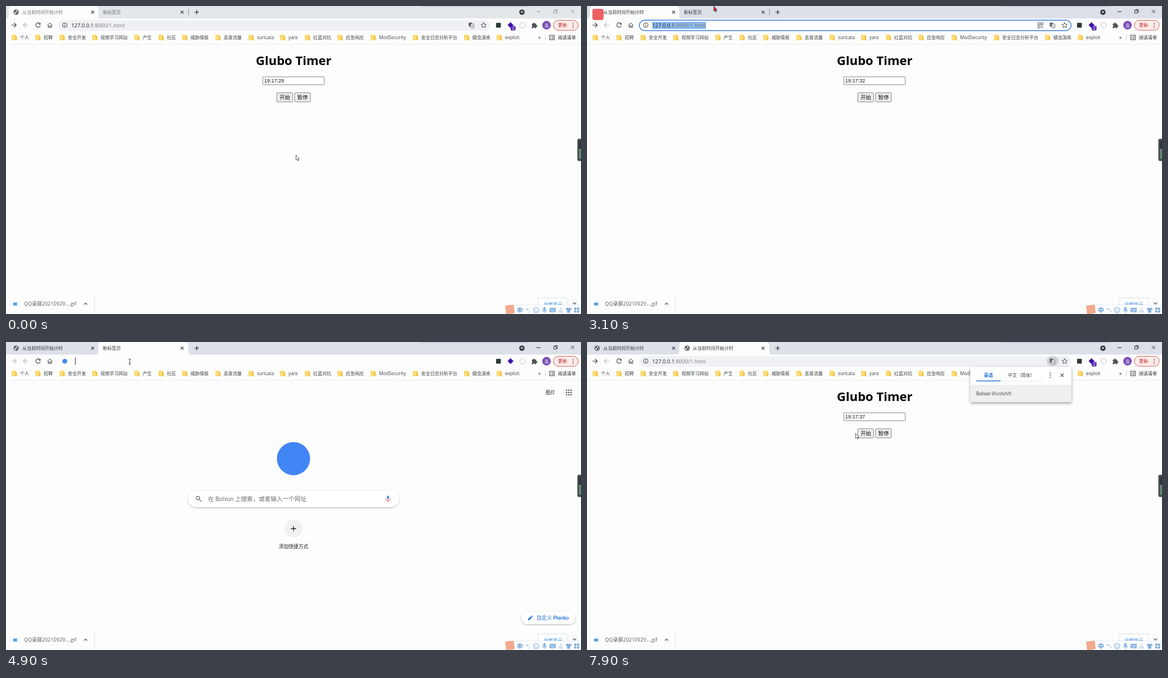
Recreate the animation shown at these times as an HTML page. Size 1022 by 548 pixels, loop 8 s.

```html
<!DOCTYPE html>
<html lang="zh-CN">
<head>
<meta charset="utf-8">
<title>Timer</title>
<style>
html, body { margin: 0; width: 100%; height: 100%; overflow: hidden; background: #fdfdfd; }
svg { display: block; width: 100vw; height: 100vh; }
text { font-family: "Open Sans", "Noto Sans CJK SC", "Noto Sans CJK", sans-serif; white-space: pre; }
.web { font-family: Roboto, "Noto Sans CJK SC", "Noto Sans CJK", sans-serif; }
.field { font-family: "Liberation Sans", "Noto Sans CJK SC", "Noto Sans CJK", sans-serif; }
</style>
</head>
<body>
<svg id="stage" viewBox="0 0 1022 548"></svg>
<script>
const PAGE = '#fdfdfd', INK = '#3c4043', GREY = '#5f6368', BLUE = '#1a6fd8';
const TITLE = '从当前时间开始计时', BRAND = 'Bolvun';
const LOOP = 8000, STEP = 100;

const text = (x, y, s, size = 8, fill = INK, more = '') =>
  `<text x="${x}" y="${y}" font-size="${size}" fill="${fill}" ${more}>${s}</text>`;
const rect = (x, y, w, h, fill, more = '') =>
  `<rect x="${x}" y="${y}" width="${w}" height="${h}" fill="${fill}" ${more}/>`;
const disc = (x, y, r, fill, more = '') =>
  `<circle cx="${x}" cy="${y}" r="${r}" fill="${fill}" ${more}/>`;
const line = (d, color = INK, w = 1.1, more = '') =>
  `<path d="${d}" fill="none" stroke="${color}" stroke-width="${w}" ${more}/>`;
const fill = (d, color) => `<path d="${d}" fill="${color}"/>`;
const at = (x, y, s) => `<g transform="translate(${x} ${y})">${s}</g>`;
const group = (id, s) => `<g id="${id}">${s}</g>`;
const tone = s => `<tspan fill="#777b80">${s}</tspan>`;

const cross = (x, y, r = 2.5, color = INK, w = 1.1) =>
  line(`M${x - r} ${y - r}l${2 * r} ${2 * r}m0 ${-2 * r}l${-2 * r} ${2 * r}`, color, w);
const plus = (x, y, r, w) => line(`M${x - r} ${y}h${2 * r}M${x} ${y - r}v${2 * r}`, '#222', w);
const lens = (x, y, k, color) =>
  disc(x - k * .3, y - k * .3, k * .65, 'none', `stroke="${color}" stroke-width="1.1"`) +
  line(`M${x + k * .2} ${y + k * .2}l${k * .8} ${k * .8}`, color, 1.3);
const globe = (x, y) => at(x, y,
  disc(0, 0, 4.7, '#50555a') +
  fill('M-3.6-.8L-1.2.2.2 1.6-.6 3.6-2.6 2.6ZM-.6-3.6L1.8-3 2.6-1.4.6-.6-.8-1.8ZM1.4.6L3.6.4 2.4 2.8Z', '#f4f5f6'));
const tab = (x, w) => fill(
  `M${x - 5} 22.5q5 0 5-5V6q0-6 6-6h${w - 12}q6 0 6 6v11.5q0 5 5 5z`, PAGE);
const arrowIcon = (x, dir, color) =>
  line(`M${x - dir * 4} 34h${dir * 8.5}M${x - dir * .2} 30l${-dir * 4} 4 ${dir * 4} 4`, color, 1.1);
const folder = x =>
  rect(x, 51, 8, 10, '#fbdc78', 'rx="1"') + rect(x + 6, 53.5, 3.5, 7.5, '#f3c84f', 'rx="1"');

function titleBar() {
  const buttons = group('winKeys',
    line('M943 10h7', 'currentColor') +
    line('M973.5 8h4.8v4.8h-4.8zM975.2 8V6.4h4.8v4.8h-1.7', 'currentColor', .9) +
    cross(1007, 9.5, 3, 'currentColor', .9));
  return rect(0, 0, 1022, 22.5, '#dde1e8', 'id="strip"') +
    group('tabA', tab(5, 159) + line('M324.5 5v12', '#8c9096', 1)) +
    group('tabB', tab(164, 160)) +
    rect(737, 0, 192, 1.3, '#c3c7df') +
    globe(18, 11) + text(29, 14.4, TITLE, 8, 'currentColor') + cross(154, 11) +
    group('blankTitle', text(172, 14.4, '新标签页', 8, 'currentColor')) +
    group('loadedTitle', globe(178, 11) + text(188, 14.4, TITLE, 8, 'currentColor')) +
    cross(313, 11) + plus(339, 11, 4, 1.2) +
    disc(917, 11, 4.8, '#3a3d42') + fill('M914.6 9.8h4.8l-2.4 2.8z', '#fff') + buttons;
}

function toolbar() {
  const info = disc(104.5, 34, 4, 'none', `stroke="${INK}"`) + line('M104.5 33.4v2.8M104.5 31.4v1.1');
  const qr = [[801.5, 30], [807, 30], [801.5, 35.5]].map(([x, y]) =>
    rect(x, y, 3.6, 3.6, 'none', `stroke="${GREY}" stroke-width="1"`)).join('') +
    rect(807, 35.5, 1.8, 1.8, GREY) + rect(809, 37.5, 1.8, 1.8, GREY);
  const star = line('M849 29.4l1.4 3 3.3.4-2.4 2.2.7 3.3-3-1.7-3 1.7.7-3.3-2.4-2.2 3.3-.4z', INK, .9);
  const language = rect(822.4, 29.6, 6, 7, GREY, 'rx=".8"') +
    rect(826, 31.8, 6, 7.2, PAGE, `rx=".8" stroke="${GREY}" stroke-width=".7"`) +
    text(826.7, 37.4, '文', 4.8, GREY);
  const extras = rect(871, 30, 8.5, 8.5, '#2a3a38', 'rx="1"') +
    rect(893, 30.2, 7.4, 7.4, '#3d10a8', 'transform="rotate(45 896.7 34)"') +
    group('badge', rect(897, 35.4, 8.6, 8.2, '#5b2bb5', 'rx="1.5"') +
      text(901.3, 42.3, '2', 7.4, '#fff', 'text-anchor="middle"')) +
    disc(918, 34.3, 4.8, 'none', 'stroke="#b9bcc0" stroke-width=".9"') +
    fill('M934.5 31.5h2.4a1.5 1.5 0 1 1 2.9 0h2.7v2.6a1.5 1.5 0 1 1 0 2.9v2.4h-2.6a1.4 1.4 0 0 0-2.8 0h-2.6v-2.6a1.5 1.5 0 0 0 0-2.9z', '#4d5156') +
    disc(960.7, 34.2, 7.6, '#7a4fb5') +
    text(960.7, 36.8, '晶', 7, '#eee', 'text-anchor="middle"') +
    rect(973, 25.5, 44, 17.6, '#fceeed', 'rx="8.8" stroke="#cf4a42" stroke-width=".9"') +
    text(981, 37.2, '更新', 8.3, '#c5221f') +
    [30.6, 34.2, 37.8].map(y => disc(1008, y, .95, '#c5221f')).join('');
  const url = text(116, 37.8, `127.0.0.1${tone(':8000/1.html')}`, 9.4, '#202124');
  return rect(0, 22.5, 1022, 45.5, PAGE) + rect(0, 67.6, 1022, .8, '#e6e7e3') +
    group('backOn', arrowIcon(14, -1, INK)) + group('backOff', arrowIcon(14, -1, '#b4b7ba')) +
    arrowIcon(35, 1, '#b4b7ba') +
    line('M60.4 31.6a4 4 0 1 0 .5 3.5') + fill('M61.4 29.8v3.5h-3.5z', INK) +
    line('M73.6 34.4L78 30.2l4.4 4.2M75 33.6v4.6h2v-2.8h2v2.8h2v-4.6', INK, 1) +
    group('siteBar',
      rect(92.5, 25, 768, 19, '#f0f1f4', 'rx="9.5"') +
      group('ring', rect(93, 25.2, 767.5, 18.6, '#fff', 'rx="9.3" stroke="#3f7fd9" stroke-width="1.5"') +
        rect(116, 28, 95.5, 13, '#8db9ec')) +
      info + url + group('qr', qr) +
      group('lit', rect(817, 25.8, 21, 16.6, '#cdd0d4', 'rx="8.3"')) + language + star) +
    extras;
}

function bookmarks() {
  const items = [[25, '个人'], [67, '招聘'], [110, '安全开发'], [168, '视频学习网站'], [243, '产生'],
    [286, '社区'], [328, '威胁情报'], [387, '恶意流量'], [446, 'suricata'], [502, 'yara'],
    [546, '红蓝对抗'], [604, '应急响应'], [663, 'ModSecurity'], [738, '安全日志分析平台'],
    [829, '蠕虫演练'], [887, 'exploit']];
  return items.map(([x, s]) => folder(x - 15) + text(x, 59, s, /[a-z]/.test(s) ? 8.2 : 8)).join('') +
    text(946, 59, '»', 9, '#222') + line('M958.5 51v10', '#cfd1d4', 1) +
    rect(966.3, 52, 8.4, 8, 'none', `stroke="${INK}"`) +
    line('M968 54.5h1m1 0h3M968 56.2h1m1 0h3M968 58h1m1 0h3', INK, .8) +
    text(981, 59, '阅读清单', 8, '#222');
}

function timerPage() {
  const key = (x, w, s) =>
    rect(x, 154.4, w, 16.2, '#efefef', 'rx="1.5" stroke="#767676" stroke-width=".9"') +
    text(x + w / 2, 166.1, s, 9.5, '#111', 'class="field" text-anchor="middle"');
  return text(511.3, 105.2, 'Glubo Timer', 22, '#000', 'font-weight="700" text-anchor="middle"') +
    rect(456.4, 126, 109.4, 14, '#fff', 'rx="1.3" stroke="#767676" stroke-width=".9"') +
    text(459, 136, '', 9.1, '#111', 'id="clock" class="field"') +
    key(481.4, 28, '开始') + key(513, 28, '暂停');
}

function newTab() {
  const dots = [0, 1, 2].flatMap(i => [0, 1, 2].map(j =>
    rect(995.2 + i * 4, 84.8 + j * 4, 2.3, 2.3, '#4d5156', 'rx=".5"'))).join('');
  return text(959, 93, '图片', 8.6, '#222') + dots +
    disc(511, 207.5, 29.5, '#4285f4') +
    rect(323.5, 264, 375, 30, '#fff', 'rx="15" filter="url(#soft)"') +
    lens(342.5, 279, 4.6, GREY) +
    text(359, 282.7, `在 ${BRAND} 上搜索，或者输入一个网址`, 10.6, '#6a6e73', 'class="web"') +
    rect(677.3, 273.4, 3.4, 6.6, '#4285f4', 'rx="1.7"') +
    line('M675.2 278.4a3.8 3.8 0 0 0 7.6 0', '#ea6a4a', 1) + line('M679 282.2v2.6', '#ea4335', 1.2) +
    disc(511, 332, 16, '#f0f1f3') + plus(511, 332, 4.6, 1.3) +
    text(511, 366.8, '添加快捷方式', 8.7, '#222', 'text-anchor="middle"') +
    rect(916, 480, 96, 22, '#fff', 'rx="11" filter="url(#soft)"') +
    fill('M928 495v-1.9l5-5 1.9 1.9-5 5zM933.6 487.4l.9-.9 1.9 1.9-.9.9z', BLUE) +
    text(943, 494.2, '自定义 Plenko', 9.1, BLUE, 'class="web" font-weight="500"');
}

const fullUrl = `${tone('http://')}127.0.0.1${tone(':8000/1.html')}`;

function dropdown() {
  const addr = 'http://127.0.0.1:8000/1.html';
  return rect(89, 23, 776, 103.5, '#fff', 'rx="5" filter="url(#deep)"') +
    rect(89, 46.5, 776, 49.5, '#f0f0f1') + rect(89, 47, 1.8, 24, '#2b73d6') +
    globe(105, 59) +
    text(123, 62.2, TITLE, 9.35, '#222') + text(209.7, 62.2, '-', 9.4, '#777b80') +
    text(217, 62.2, addr, 9.6, '#2b62cc', 'font-weight="600"') +
    cross(851.5, 58.5, 2.8) +
    rect(121, 71.3, 106, 19.5, 'none', 'rx="9.7" stroke="#c3c6ca" stroke-width=".9"') +
    rect(129.8, 77.8, 7.4, 6.4, 'none', `stroke="${INK}" stroke-width=".9"`) + rect(133.5, 77.5, 4, 2.4, INK) +
    text(144, 84.4, '切换到这个标签页', 9.4, '#222') +
    lens(104.6, 108.4, 3.9, GREY) +
    text(123, 112, addr, 9.5, '#202124') +
    text(251, 112, `- ${BRAND} 搜索`, 9.4, '#777b80');
}

function languageBubble() {
  return rect(681.5, 44, 179.5, 63, '#fff', 'rx="2.5" filter="url(#deep)"') +
    rect(681.5, 76, 179.5, 31, '#eff0ee', 'rx="2"') +
    rect(735, 69, 75, .8, '#e0e2e4') + rect(692, 68.6, 43, 1.4, BLUE) +
    text(705.5, 62.2, '英语', 8, BLUE, 'font-weight="700"') +
    text(748, 62.2, '中文（简体）', 8, INK) +
    [55.2, 59, 62.8].map(y => disc(823.3, y, .95, INK)).join('') + cross(844.5, 59, 2.8) +
    text(692, 95, `<tspan font-weight="500">${BRAND}</tspan> Wordshift`, 8.2, GREY, 'class="web"');
}

function shelf() {
  const c = '#7fb0df';
  const ime = rect(888, 531.5, 134, 16.5, '#fdfdfe') + rect(904, 531.5, 118, .7, '#d8e4ef') +
    rect(888, 532, 15.5, 15.5, '#f3aa8c', 'rx="2" transform="rotate(-7 896 540)"') +
    text(908.3, 544.6, '中', 10.4, '#4c8fd0', 'font-weight="700"') +
    disc(926.5, 539.5, 1.5, 'none', `stroke="${c}"`) + line('M931 542.5q.4 2-1.4 2.6', c, 1.3) +
    disc(942.3, 541, 4.8, 'none', `stroke="${c}" stroke-width="1.1"`) +
    disc(940.5, 539.6, .8, c) + disc(944.1, 539.6, .8, c) + line('M939.6 542.2q2.7 2.8 5.4 0', c, 1) +
    rect(955, 535.5, 4, 7, c, 'rx="2"') + line('M953.2 540a3.8 3.8 0 0 0 7.6 0M957 544v2.4', c, 1.1) +
    rect(966, 537, 11, 8, c, 'rx="1"') +
    line('M967.5 539.4h8M967.5 541.3h8', '#fff', .9, 'stroke-dasharray="1.2 1"') + line('M969 543.4h5', '#fff', .9) +
    disc(986, 538.3, 2, '#d5dfe9') + fill('M981.5 545.5q0-4.8 4.5-4.8t4.5 4.8z', '#d5dfe9') +
    fill('M997.6 536.5q2.4 2 4.8 0l3 2-1.2 2.4-1.4-.6v5.4h-5.6v-5.4l-1.4.6-1.2-2.4z', c) +
    [[1010, 536.5], [1015, 536.5], [1010, 541.5], [1015, 541.5]].map(([x, y]) => rect(x, y, 4, 4, c, 'rx=".7"')).join('');
  return fill('M13.5 525h5l2.5 2.5v7.5h-7.5z', '#dfeaf4') + rect(12.5, 528, 7, 4.6, '#4a9fd8', 'rx=".6"') +
    text(32, 533.2, 'QQ录屏20210929....gif', 9, '#55595e') +
    line('M138.6 531.4l2.9-2.9 2.9 2.9') + line('M157 516v29', '#dadce0', .9) +
    rect(945.5, 519.5, 52.5, 20, '#fff', 'rx="2" stroke="#dadce0" stroke-width=".9"') +
    text(955.5, 533.8, '全部显示', 8.3, BLUE) + line('M1007.6 527.6l2.9 2.9 2.9-2.9', INK, 1.2) + ime;
}

const sideWidget = rect(1015.5, 236.3, 10, 39.4, '#4a4d54', 'rx="3"') +
  rect(1018, 240, 4, 32, '#33363b') + rect(1018.4, 254, 3.6, 17.5, '#6aa77c') +
  line('M1020.2 254v17.5', '#4a4d54', 3.6, 'stroke-dasharray=".6 1.6"');

const $ = id => document.getElementById(id);
$('stage').innerHTML = `<defs>
  <filter id="soft" x="-10%" y="-30%" width="120%" height="170%"><feDropShadow dx="0" dy="1" stdDeviation="1.4" flood-opacity=".3"/></filter>
  <filter id="deep" x="-5%" y="-15%" width="110%" height="140%"><feDropShadow dx="0" dy="2" stdDeviation="2.4" flood-opacity=".38"/></filter>
  </defs>` + rect(0, 0, 1022, 548, PAGE) +
  group('tabBar', titleBar()) + toolbar() + bookmarks() +
  group('timer', timerPage()) + group('blank', newTab()) + shelf() +
  group('drop', dropdown()) +
  group('entry', group('dot', disc(104.5, 34.3, 4.2, '#4285f4')) +
    group('typed', globe(104.5, 34.3) + text(123, 37.8, fullUrl, 9.4, '#202124')) +
    rect(0, 28, 1, 12.5, '#222', 'id="caret"')) +
  group('bubble', languageBubble()) + group('side', sideWidget) +
  group('picker', rect(9.5, 5, 20, 20, '#ec6064', 'rx="4"')) +
  group('pointer',
    group('arrow', '<path id="tip" d="M.4.4V9.4L2.5 7.5 3.9 10.6 5.3 10 3.9 6.9H6.3Z" stroke="#333" stroke-width=".8"/>') +
    group('beam', line('M-1.8-4.5h1.4l.4.4.4-.4h1.4M0-4.1v8.2M-1.8 4.5h1.4l.4-.4.4.4h1.4', '#222', .9)));

// time, x, y of the pointer
const path = [[0, 515, 265], [300, 515, 265], [1000, 410, 150], [1600, 262, 48], [1900, 205, 34],
  [2600, 198, 33], [3100, 225, 0], [3400, 221, 9], [3700, 215, 22], [4100, 196, 10], [4300, 200, 13],
  [4700, 220, 35], [5900, 220, 35], [6400, 285, 120], [7000, 358, 213], [7300, 358, 213], [7900, 477, 162]];

function place(t) {
  const i = Math.max(1, path.findIndex(p => p[0] >= t));
  const [a, x, y] = path[i - 1], [b, u, v] = path[i];
  const k = Math.min(1, (t - a) / (b - a));
  return [x + (u - x) * k, y + (v - y) * k];
}

const show = (id, on) => $(id).style.display = on ? '' : 'none';

function draw(now) {
  const t = Math.min(Math.floor(now % LOOP / STEP) * STEP, 7900);
  const active = t >= 2200 && t < 3400 || t >= 4100;
  const second = t >= 4200, loaded = t >= 6400, pasted = t >= 5200;
  const blank = second && !loaded;
  const picked = t >= 2500 && t < 3400;
  const bubble = t >= 6800;

  $('strip').setAttribute('fill', active ? '#dce0e8' : '#e3e7ea');
  $('tabBar').style.color = active ? '#33373b' : '#70757a';
  $('winKeys').style.color = active ? '#222' : '#92979c';
  show('tabA', !second);
  show('tabB', second);
  show('blankTitle', !loaded);
  show('loadedTitle', loaded);
  show('backOn', !blank);
  show('backOff', blank);
  show('siteBar', !blank);
  show('badge', !blank);
  show('ring', active && !second);
  show('qr', t >= 2200 && !second);
  show('lit', bubble);
  show('bubble', bubble);
  show('timer', !blank);
  show('blank', blank);
  show('drop', pasted && t < 5900);
  show('entry', blank);
  show('dot', !pasted);
  show('typed', pasted);
  show('caret', (t - (pasted ? 5200 : 3900)) % 1000 < 500);
  $('caret').setAttribute('x', pasted ? 247.5 : 122.8);
  show('side', active || t < 500);
  show('picker', picked);
  $('clock').textContent = '19:17:' + (loaded ? 37 : 29 + Math.floor((t + 700) / 1000));

  const [x, y] = place(t);
  const beam = y >= 26 && y <= 43 && x < 800;
  $('pointer').setAttribute('transform', `translate(${x} ${y})`);
  $('tip').setAttribute('fill', picked ? '#e8203a' : '#fff');
  show('beam', beam);
  show('arrow', !beam);
}

const start = performance.now();
function tick() {
  draw(performance.now() - start);
  requestAnimationFrame(tick);
}
tick();
</script>
</body>
</html>
```
